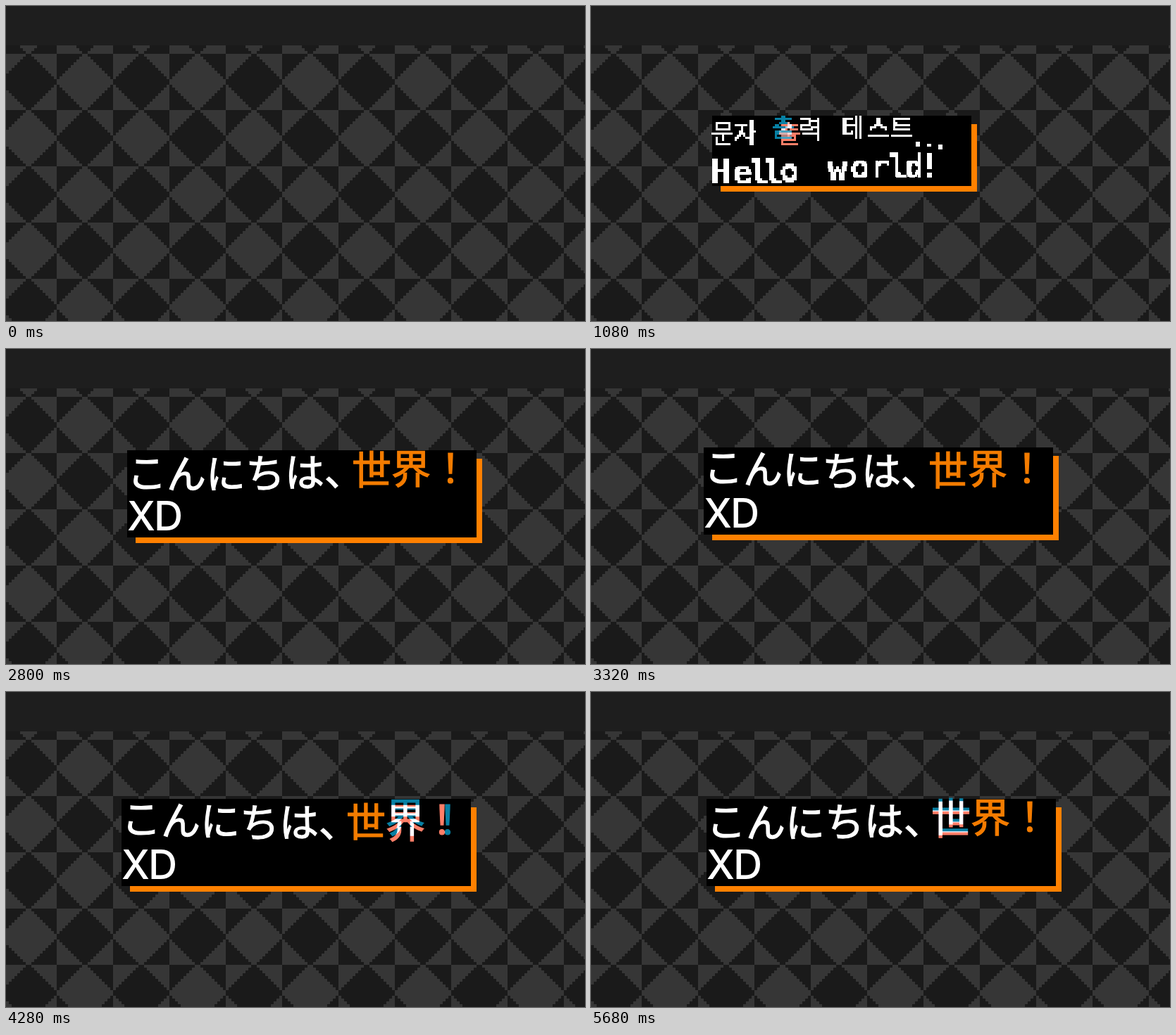
These frames come from a looping animation (822 px wide and 448 px high, 5720 ms). An HTML page without scripts:

```html
<!DOCTYPE html>
<html lang="ko">
<head>
<meta charset="utf-8">
<title>Text box</title>
<style>
@property --t { syntax: "<number>"; inherits: true; initial-value: 0; }
@property --g { syntax: "<number>"; inherits: true; initial-value: 0; }
@property --dx { syntax: "<number>"; inherits: true; initial-value: 0; }
@property --dy { syntax: "<number>"; inherits: true; initial-value: 0; }

html, body { margin: 0; width: 100%; height: 100%; overflow: hidden; background: #1e1e1e; }
.stage {
  position: relative; width: 822px; height: 448px; overflow: hidden;
  animation: clock 5720ms steps(143) infinite;
}
svg { position: absolute; left: 0; top: 0; display: block; overflow: visible; }
.shake { position: absolute; left: 0; top: 0; animation: shake 5720ms step-end infinite; }

.box { position: absolute; left: 172px; top: 156px; animation: grow 5720ms step-end infinite; }
.box::before, .box::after { content: ""; position: absolute; }
.box::before { inset: 12px -8px -8px 12px; background: #ff8000; }
.box::after { inset: 0; background: #000; }

/* Each glyph is typed at --on and removed at --off */
.c {
  opacity: min(clamp(0, var(--t) - var(--on) + 1, 1), clamp(0, var(--off) - var(--t), 1));
  fill: #fff;
}
.wave .c {
  transform: translateY(calc(4.5px * cos((var(--t) - 2080) * 1.5deg - (var(--i) - 1.5) * 23deg)));
}
.one .c { --on: calc(120 + 22 * var(--i)); --off: 1720; }
.two .c { --on: calc(1720 + 60 * var(--i)); --off: 9999; }

.ko { font: 400 36px "Noto Sans CJK KR", "Noto Sans CJK JP", sans-serif; text-anchor: middle; }
.ko text { stroke: currentColor; stroke-width: .7px; color: #fff; }
.en { font: 700 46px "DejaVu Sans Mono", monospace; }
.dots { font: 700 30px "DejaVu Sans Mono", monospace; }
.ja { font: 400 56px "Noto Sans CJK JP", sans-serif; text-anchor: middle; color: #fff; }
.ja text { stroke: currentColor; stroke-width: 1.2px; }
.xd { font: 500 57px Inter, "Noto Sans", sans-serif; }

.c .plain { opacity: calc(1 - var(--g)); }
.ja .plain { fill: #f47c00; color: #f47c00; }
.c .cold, .c .warm { opacity: var(--g); mix-blend-mode: plus-lighter; }
.c .cold { fill: #0880a4; color: #0880a4; transform: translate(calc(var(--dx) * 1px), calc(var(--dy) * 1px)); }
.c .warm { fill: #ff7f68; color: #ff7f68; transform: translate(calc(var(--dx) * -1px), calc(var(--dy) * -1px)); }
.z1, .z2, .z3, .z4 { animation: 5720ms step-end infinite; }
.z1 { animation-name: zap1; }
.z2 { animation-name: zap2; }
.z3 { animation-name: zap3; }
.z4 { animation-name: zap4; }

@keyframes clock { from { --t: 0; } to { --t: 5720; } }
@keyframes grow {
  0% { width: 0; height: 0; }
  2.05% { width: 36px; height: 52px; animation-timing-function: steps(11); }
  6.9% { width: 368px; height: 52px; }
  7.6% { width: 368px; height: 100px; }
  30.02% { width: 60px; height: 60px; }
  30.77% { width: 60px; height: 60px; animation-timing-function: steps(5); }
  36% { width: 340px; height: 60px; }
  37% { width: 384px; height: 60px; animation-timing-function: steps(2); }
  39.1% { width: 496px; height: 60px; }
  41.2%, 100% { width: 496px; height: 124px; }
}
@keyframes shake {
  0% { transform: none; }
  44% { transform: translate(4px, -4px); }
  45.4% { transform: translate(-8px, 0); }
  46.8% { transform: translate(12px, -8px); }
  48.2% { transform: translate(0, -12px); }
  49.6% { transform: translate(-12px, -4px); }
  51% { transform: translate(8px, -16px); }
  52.4% { transform: translate(-4px, 0); }
  53.8% { transform: translate(4px, -8px); }
  55.2% { transform: translate(-16px, 4px); }
  56.6% { transform: translate(0, 8px); }
  57.9% { transform: translate(-12px, -16px); }
  59.4% { transform: translate(4px, -4px); }
  60.8% { transform: translate(-4px, 8px); }
  62.2% { transform: translate(-12px, 0); }
  63.5%, 100% { transform: translate(-8px, -4px); }
}
@keyframes zap1 {
  0%, 14.6%, 20.2%, 26.5%, 100% { --g: 0; --dx: 0; --dy: 0; }
  13.2% { --g: 1; --dx: 4; --dy: 0; }
  18.8% { --g: 1; --dx: -4; --dy: -4; }
  25.1% { --g: 1; --dx: 0; --dy: 4; }
}
@keyframes zap2 {
  0%, 54.5%, 69.2%, 83.2%, 100% { --g: 0; --dx: 0; --dy: 0; }
  53.1% { --g: 1; --dx: 3; --dy: 0; }
  67.8% { --g: 1; --dx: -3; --dy: 2; }
  81.8% { --g: 1; --dx: 0; --dy: 4; }
  98.5% { --g: 1; --dx: 0; --dy: -2; }
}
@keyframes zap3 {
  0%, 63.6%, 75.5%, 91.6%, 100% { --g: 0; --dx: 0; --dy: 0; }
  62.2% { --g: 1; --dx: 2; --dy: 2; }
  74.1% { --g: 1; --dx: 0; --dy: -4; }
  90.2% { --g: 1; --dx: -4; --dy: 0; }
}
@keyframes zap4 {
  0%, 52.4%, 75.5%, 88%, 100% { --g: 0; --dx: 0; --dy: 0; }
  51% { --g: 1; --dx: 0; --dy: 3; }
  74.1% { --g: 1; --dx: 4; --dy: 0; }
  86.6% { --g: 1; --dx: -2; --dy: -2; }
}
</style>
</head>
<body>
<div class="stage">
  <svg width="822" height="448" shape-rendering="crispEdges">
    <defs>
      <g id="gem">
        <rect x="36" width="8" height="80"/>
        <rect x="32" y="4" width="16" height="72"/>
        <rect x="28" y="8" width="24" height="64"/>
        <rect x="24" y="12" width="32" height="56"/>
        <rect x="20" y="16" width="40" height="48"/>
        <rect x="16" y="20" width="48" height="40"/>
        <rect x="12" y="24" width="56" height="32"/>
        <rect x="8" y="28" width="64" height="24"/>
        <rect x="4" y="32" width="72" height="16"/>
        <rect y="36" width="80" height="8"/>
      </g>
      <pattern id="tiles" x="-8" y="68" width="160" height="160" patternUnits="userSpaceOnUse">
        <rect width="160" height="160" fill="#1a1a1a"/>
        <path d="M0 0h80v160h80v-80h-160z" fill="#363636"/>
        <use href="#gem" fill="#1a1a1a"/>
        <use href="#gem" x="80" y="80" fill="#1a1a1a"/>
        <use href="#gem" x="80" fill="#363636"/>
        <use href="#gem" y="80" fill="#363636"/>
      </pattern>
      <!-- Mosaic filters for the bitmap lettering -->
      <filter id="fine" filterUnits="userSpaceOnUse" x="0" y="0" width="822" height="448" color-interpolation-filters="sRGB">
        <feFlood x="1" y="1" width="1" height="1"/>
        <feOffset x="0" y="0" width="3" height="3"/>
        <feTile result="grid"/>
        <feComponentTransfer in="SourceGraphic"><feFuncA type="discrete" tableValues="0 1"/></feComponentTransfer>
        <feComposite in2="grid" operator="in"/>
        <feMorphology operator="dilate" radius="1"/>
      </filter>
      <filter id="bold" filterUnits="userSpaceOnUse" x="0" y="0" width="822" height="448" color-interpolation-filters="sRGB">
        <feFlood x="1" y="1" width="2" height="2"/>
        <feOffset x="0" y="0" width="4" height="4"/>
        <feTile result="grid"/>
        <feComponentTransfer in="SourceGraphic"><feFuncA type="discrete" tableValues="0 1"/></feComponentTransfer>
        <feComposite in2="grid" operator="in"/>
        <feMorphology operator="dilate" radius="1"/>
      </filter>
    </defs>
    <rect y="56" width="822" height="392" fill="url(#tiles)"/>
  </svg>

  <div class="shake">
    <div class="box"></div>
    <svg width="822" height="448">
      <g class="one wave">
        <g class="ko" filter="url(#fine)">
          <text class="c" style="--i:0" x="187" y="191">문</text>
          <text class="c" style="--i:1" x="219" y="191">자</text>
          <g class="c z1" style="--i:3">
            <text class="plain" x="277" y="191">출</text>
            <text class="cold" x="277" y="191">출</text>
            <text class="warm" x="277" y="191">출</text>
          </g>
          <text class="c" style="--i:4" x="311" y="191">력</text>
          <text class="c" style="--i:6" x="372" y="191">테</text>
          <text class="c" style="--i:7" x="408" y="191">스</text>
          <text class="c" style="--i:8" x="441" y="191">트</text>
        </g>
        <g class="dots" filter="url(#bold)">
          <text class="c" style="--i:9" x="455" y="202">.</text>
          <text class="c" style="--i:10" x="471" y="202">.</text>
          <text class="c" style="--i:11" x="487" y="202">.</text>
        </g>
        <g class="en" filter="url(#bold)">
          <text class="c" style="--i:13" x="170" y="248">H</text>
          <text class="c" style="--i:14" x="201" y="248">e</text>
          <text class="c" style="--i:15" x="225" y="248">l</text>
          <text class="c" style="--i:16" x="245" y="248">l</text>
          <text class="c" style="--i:17" x="268" y="248">o</text>
          <text class="c" style="--i:19" x="336" y="248">w</text>
          <text class="c" style="--i:20" x="368" y="248">o</text>
          <text class="c" style="--i:21" x="396" y="248">r</text>
          <text class="c" style="--i:22" x="422" y="248">l</text>
          <text class="c" style="--i:23" x="445" y="248">d</text>
          <text class="c" style="--i:24" x="467" y="248">!</text>
        </g>
      </g>

      <g class="two wave ja">
        <text class="c" style="--i:0" x="200" y="205.5">こ</text>
        <text class="c" style="--i:1" x="256" y="205.5">ん</text>
        <text class="c" style="--i:2" x="312" y="205.5">に</text>
        <text class="c" style="--i:3" x="368" y="205.5">ち</text>
        <text class="c" style="--i:4" x="424" y="205.5">は</text>
        <text class="c" style="--i:5" x="480" y="205.5">、</text>
        <g class="c z2" style="--i:6">
          <text class="plain" x="519" y="205.5">世</text>
          <text class="cold" x="519" y="205.5">世</text>
          <text class="warm" x="519" y="205.5">世</text>
        </g>
        <g class="c z3" style="--i:7">
          <text class="plain" x="575" y="205.5">界</text>
          <text class="cold" x="575" y="205.5">界</text>
          <text class="warm" x="575" y="205.5">界</text>
        </g>
        <g class="c z4" style="--i:8">
          <text class="plain" x="631" y="205.5">！</text>
          <text class="cold" x="631" y="205.5">！</text>
          <text class="warm" x="631" y="205.5">！</text>
        </g>
      </g>
      <g class="two xd">
        <text class="c" style="--i:10" x="172" y="270">X</text>
        <text class="c" style="--i:11" x="210" y="270">D</text>
      </g>
    </svg>
  </div>
</div>
</body>
</html>
```
